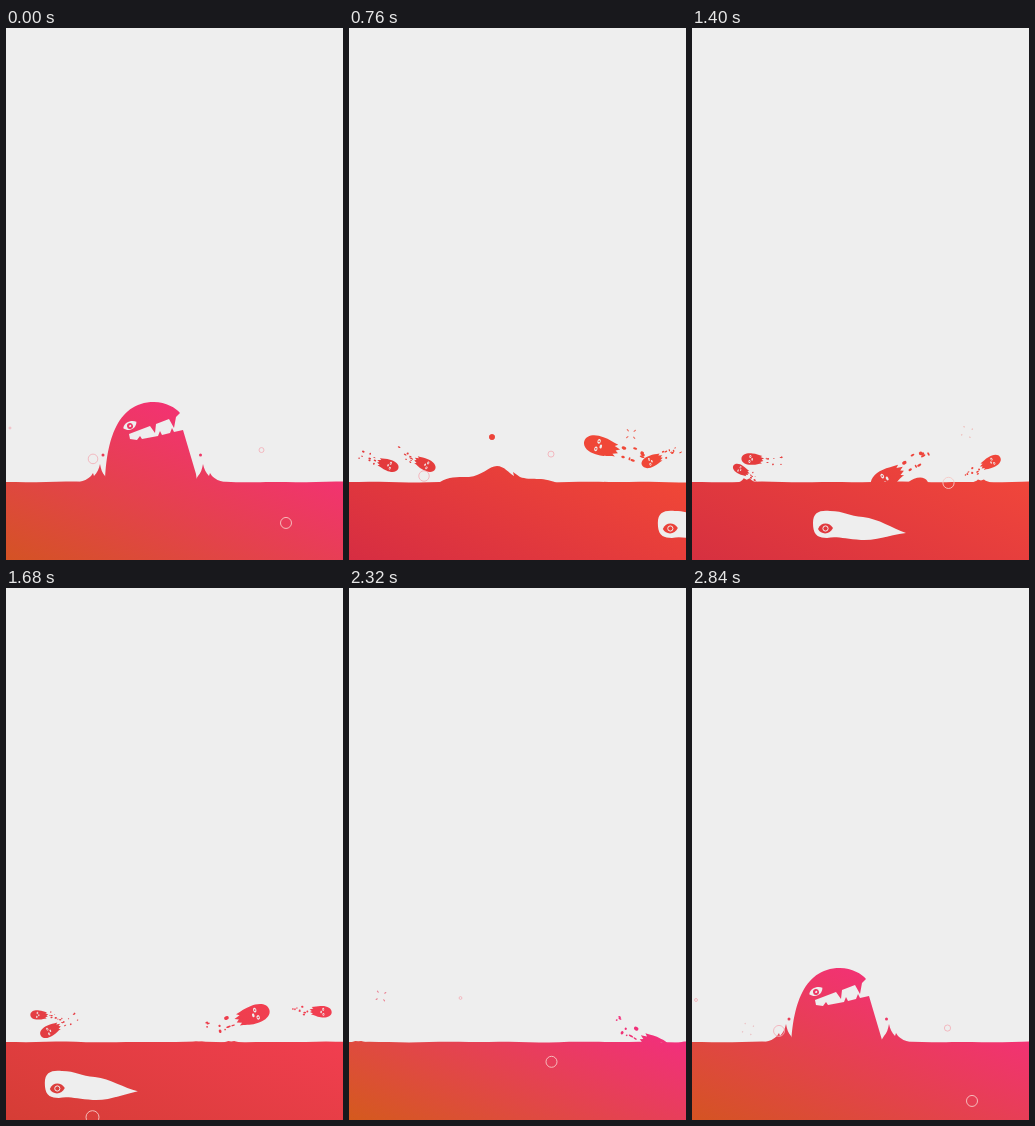
These frames come from a looping animation (337x532 px, 2.88 s). An HTML page:

```html
<!DOCTYPE html>
<html lang="en">
<head>
<meta charset="utf-8">
<title>Sea monster</title>
<style>
html, body { margin: 0; height: 100%; overflow: hidden; background: #eee; }
svg { display: block; width: 100vw; height: 100vh; }
</style>
</head>
<body>
<svg viewBox="0 0 337 532">
  <defs>
    <linearGradient id="tint" gradientUnits="userSpaceOnUse" x1="0" y1="532" x2="79" y2="346">
      <stop id="low" offset="0"/>
      <stop id="high" offset="1"/>
    </linearGradient>
    <mask id="ink" maskUnits="userSpaceOnUse" x="0" y="0" width="337" height="532"><g id="shapes" fill="#fff"></g></mask>
  </defs>
  <rect width="337" height="532" fill="url(#tint)" mask="url(#ink)"/>
  <g id="bubbles" fill="none" stroke-width=".9"></g>
</svg>
<script>
const LOOP = 2880, STEP = 40, SEA = 454;
const $ = id => document.getElementById(id);
const lerp = (a, b, p) => a + (b - a) * p;
const clamp = v => Math.max(0, Math.min(1, v));
const smooth = (a, b, t) => { const p = clamp((t - a) / (b - a)); return p * p * (3 - 2 * p); };
const mix = (a, b, p) => `rgb(${a.map((v, i) => Math.round(lerp(v, b[i], p)))})`;
// signed distance in time around the loop
const around = (t, at) => ((t - at + LOOP * 1.5) % LOOP) - LOOP / 2;

const dot = (x, y, r, extra = '') => `<circle cx="${x}" cy="${y}" r="${r}" ${extra}/>`;
const oval = (x, y, rx, ry, extra = '') => `<ellipse cx="${x}" cy="${y}" rx="${rx}" ry="${ry}" ${extra}/>`;
const path = (d, extra = '') => `<path d="${d}" ${extra}/>`;
const group = (move, body) => `<g transform="${move}">${body}</g>`;
const line = (x1, y1, x2, y2, w, extra = '') =>
  path(`M${x1},${y1}L${x2},${y2}`, `stroke="#fff" stroke-width="${w}" stroke-linecap="round" ${extra}`);

// monster outline: mouth closed and mouth open, same point order
const SHUT = [99,470, 98,420, 108,374, 148,374, 160,374, 170,380, 174,385, 170,389, 168,400, 163,391,
  150,396, 149,405, 144,398, 123,406, 124,411, 131,412, 134,408, 136,411, 152,408, 154,403, 156,407,
  164,405, 166,400, 168,404, 177,402, 190,446, 196,490];
const OPEN = [99,470, 96,430, 103,392, 146,389, 146,389, 146,389, 146,389, 143,396, 148,402, 140,401,
  134,412, 140,418, 133,418, 122,437, 123,441, 133,441, 135,437, 137,441, 156,440, 158,436, 160,440,
  168,439, 170,435, 172,438, 178,436, 182,454, 190,490];

function monster(m) {
  if (m < -300 || m > 740) return '';
  const open = smooth(50, 340, m);
  const rise = .00094 * ((Math.min(m, 60) - 60) ** 2 - 3600) * (1 - open);
  const y = rise + 90 * clamp((m - 390) / 310) ** 2;
  const v = SHUT.map((a, i) => lerp(a, OPEN[i], open).toFixed(1));
  const d = `M${v.slice(0, 2)}C${v.slice(2, 14)}L${v.slice(14)}V560H99Z`;
  const eye = group(`translate(${lerp(124, 112, open)},${lerp(398, 436, open)}) rotate(${lerp(-10, -75, open)})`,
    path('M-7,1C-5,-5 3,-6 7,-3C6,4 -2,6 -7,1Z', 'fill="#000"') + dot(0, 0, 3) + dot(.2, 0, 1.1, 'fill="#000"'));
  return group(`translate(0,${y})`, path(d) + eye);
}

function splash(m) {
  const s = smooth(-250, -80, m) * (1 - smooth(20, 260, m));
  const dropY = 426 + .001 * (m - 30) ** 2;
  const side = path('M68,1C78,0 83,-4 85,-6L87,-9L88,-6C91,-9 93,-13 94,-18C95,-13 96,-9 99,-6L104,2Z') ;
  return group(`translate(0,${SEA}) scale(1,${s})`, side) +
    group(`translate(291,${SEA}) scale(-1,${s})`, side) +
    (m > -250 && m < 260 ? dot(97, dropY, 1.5) + dot(194.5, dropY, 1.5) : '');
}

function wake(t) {
  const s = smooth(600, 740, t) * (1 - smooth(770, 1000, t));
  return group(`translate(0,${SEA}) scale(1,${s})`,
    path('M88,2C98,-6 110,-5 120,-5C133,-6 140,-16 148,-16C155,-16 160,-9 165,-6L164,-10L171,-5C182,-1 192,-6 208,1Z'));
}

function spit(t) {
  if (t < 250 || t > 850) return '';
  const x = 155 - .03 * (t - 360), y = 338 + .00105 * (t - 500) ** 2;
  const long = 26 * (1 - smooth(380, 600, t)), h = long / 2;
  const x2 = 177 + .1 * (t - 360), y2 = 355 + .0011 * (t - 450) ** 2;
  const h2 = 4.5 * (1 - smooth(380, 600, t));
  return path(`M${x + h * .2},${y - h}Q${x + 3 * h / 13},${y} ${x - h * .2},${y + h}`,
      `fill="none" stroke="#fff" stroke-width="${long > 1 ? 4.5 : 5.5}" stroke-linecap="round"`) +
    (long < 1 ? dot(x, y, 2.8) : dot(x + h * .2, y - h + 1, 2.5)) +
    line(x2 - h2, y2 + h2, x2 + h2, y2 - h2, 3);
}

// x at the top of the jump, top y, time of the top, speed (sign is heading), size, gravity
const FISH = [
  [31.5, 434, 626, .0575, .63, .00017],
  [64.5, 428, 538, .053, .65, .00017],
  [313, 427.6, 582, -.0575, .63, .00017],
  [236.5, 413, 933, -.089, 1.02, .00017],
  [59, 431, 1420, -.057, .63, .00017],
  [32, 427, 1695, -.057, .5, .00017],
  [313.5, 423.5, 1651, .058, .62, .00017],
  [265, 420, 1870, .094, 1, .00019]
];
const BODY = 'M17,0C17,7 8,10 0,9C-7,9 -11,6 -16,6L-13,4L-18,2L-15,0L-19,-2L-13,-4L-16,-6C-10,-7 -6,-9 0,-9C8,-10 17,-7 17,0Z';
const FACE = oval(3, -4, 1.6, 2.4) + oval(4, 4, 1.6, 2.3) + oval(0, .5, 1.2, 2) + dot(3, -4, .8, 'fill="#fff"') + dot(4, 4, .8, 'fill="#fff"');

function seeded(seed) {
  return () => (seed = seed * 16807 % 2147483647) / 2147483647;
}

const TRAILS = FISH.map((_, n) => {
  const rnd = seeded(911 + n * 77);
  let out = '';
  for (let i = 0; i < 9; i++) out += oval(-22 - rnd() * 26, rnd() * 16 - 8, .8 + rnd() * 1.7, .7 + rnd() * 1.2);
  return out;
});

function ripple(x, age) {
  if (age < -60 || age > 300) return '';
  const h = 4 * smooth(-60, 60, age) * (1 - smooth(80, 300, age));
  return path(`M${x - 12},455Q${x - 5},454 ${x - 3},${SEA - h}L${x},${SEA - h * .6}L${x + 3},${SEA - h}Q${x + 6},454 ${x + 13},455Z`);
}

function fish([x0, top, at, speed, size, pull], n, t) {
  const dt = t - at, y = top + pull * dt * dt;
  const half = Math.sqrt((SEA - top) / pull);
  const ripples = ripple(x0 - speed * half, dt + half) + ripple(x0 + speed * half, dt - half);
  if (y > 505) return ripples;
  const tilt = Math.atan(2 * pull * dt / Math.abs(speed)) * 28;
  return ripples + group(`translate(${x0 + speed * dt},${y}) scale(${Math.sign(speed) * size},${size}) rotate(${tilt})`,
    path(BODY) + `<g fill="#000">${FACE}</g>` + TRAILS[n]);
}

// x, y, start
const SPARKS = [[78,405,240], [315,408,30], [282,406,640], [275,404,1080], [110,409,1720], [104,436,1740], [32,408,2130], [56,441,2500]];

function spark([x, y, start], t) {
  const p = (t - start) / 400;
  if (p < 0 || p > 1) return '';
  const r = 3 + 3.5 * p, len = 2.5 * (1 - p);
  let out = '';
  for (let i = 0; i < 4; i++) {
    const a = .75 + i * Math.PI / 2 + p * .4, c = Math.cos(a), s = Math.sin(a);
    out += line(x + c * r, y + s * r, x + c * (r + len), y + s * (r + len), 1.1, `opacity="${1 - p * .8}"`);
  }
  return out;
}

function swimmer(t) {
  const x = 121 - .2935 * (t - 1400);
  if (x > 340 || x < -100) return '';
  const tip = 20 - 4 * smooth(1400, 2000, t);
  return group(`translate(${x},485)`,
    path(`M0,10C0,-1 7,-3 17,-2C31,-2 36,3 50,4C66,6 79,15 93,${tip}C76,22 63,28 48,27C32,26 24,23 14,25C3,25 0,20 0,10Z`, 'fill="#000"') +
    path('M5,16C8,9 16,9 20,15C17,22 8,22 5,16Z') +
    dot(12.5, 15.5, 2.6, 'fill="none" stroke="#000" stroke-width="1"'));
}

function sea(t) {
  let d = `M0,532V${SEA}`;
  for (let x = 0; x <= 340; x += 10) {
    d += `L${x},${(SEA + .45 * Math.sin(x * .07 + t * Math.PI * 4 / LOOP) * Math.sin(x * .023)).toFixed(2)}`;
  }
  return path(d + 'V532Z');
}

// x, radius, time at the surface, speed
const BUBBLES = [[280,5.5,91,.45], [255.5,3.5,2809,.45], [87,6,2803,.3], [4,2.5,2700,.3], [-2,5.3,409,.45],
  [202,4,698,.45], [75,5.5,740,.3], [256.5,5.6,1402,.45], [86.5,6.5,1868,.4], [156,5.5,2067,.45],
  [164,2.5,1880,.44], [209.5,1.7,1982,.45], [202.5,5.5,2364,.45], [111.5,2.5,2220,.44]];

function bubble([x, r, at, speed], t) {
  const y = SEA - speed * around(t, at);
  if (y < 392 || y > 540) return '';
  const size = r * Math.sqrt(Math.min(1, (y - 390) / 64));
  return dot(x, y, size, `stroke="${y > SEA ? '#f7c9c6' : '#f3b3ba'}"`);
}

function draw(t) {
  const m = around(t, 0);
  const warm = .5 + .5 * Math.cos((t - 1040) / LOOP * Math.PI * 2);
  $('low').setAttribute('stop-color', mix([212, 92, 28], [214, 40, 70], warm));
  $('high').setAttribute('stop-color', mix([242, 46, 126], [240, 74, 48], warm));
  $('shapes').innerHTML = monster(m) + splash(m) + wake(t) + spit(t) +
    FISH.map((f, n) => fish(f, n, t)).join('') +
    SPARKS.map(s => spark(s, t)).join('') + sea(t) + swimmer(t);
  $('bubbles').innerHTML = BUBBLES.map(b => bubble(b, t)).join('');
}

const begin = performance.now();
function tick() {
  const t = (performance.now() - begin) % LOOP;
  draw(Math.floor(t / STEP) * STEP);
  requestAnimationFrame(tick);
}
tick();
</script>
</body>
</html>
```
